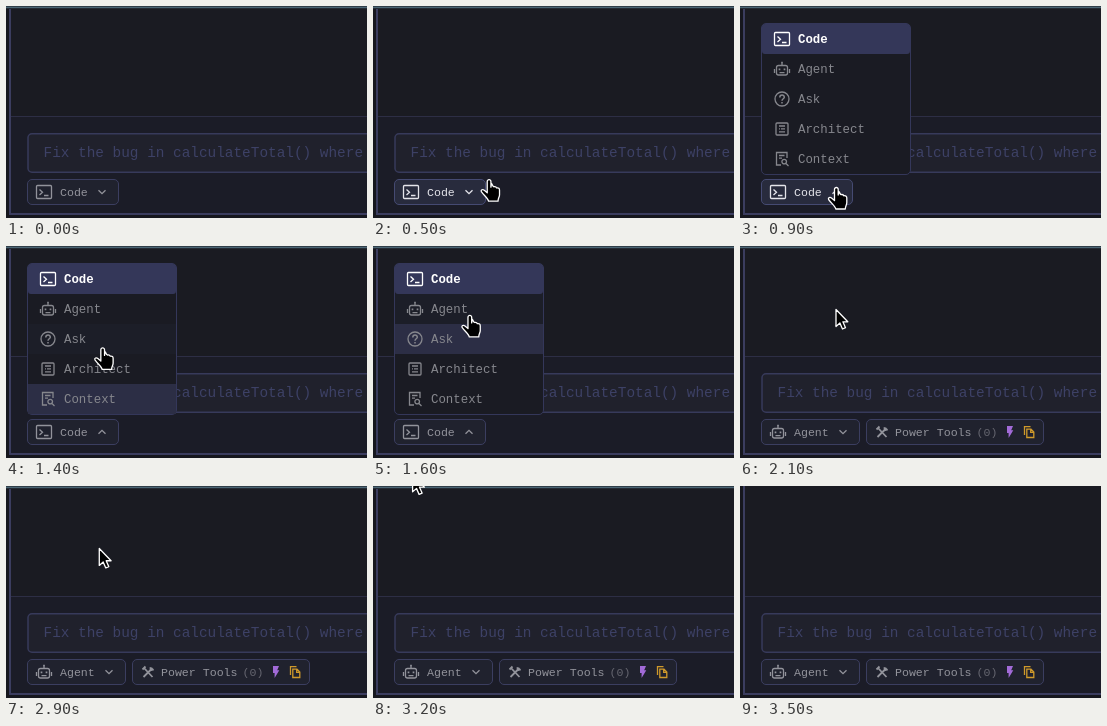
Recreate the animation shown at these times as an HTML page. Size 361 by 212 pixels, loop 3700 ms.

```html
<!DOCTYPE html>
<html lang="en">
<head>
<meta charset="utf-8">
<title>Mode picker</title>
<style>
  html, body { margin: 0; height: 100%; overflow: hidden; background: #16171e; }
  svg.stage { display: block; width: 100vw; height: 100vh; }
  text { font: 11.6px "Liberation Mono", monospace; fill: currentColor; white-space: pre; }
  .icon { fill: none; stroke: currentColor; stroke-width: 1.3; }
  .prompt { font-size: 14.4px; fill: #3d4166; }
  .button { color: #92939b; }
  .button rect.box { fill: #20222e; stroke: #3b3e60; }
  .button.hover { color: #e4e4ea; }
  .button.hover rect.box { fill: #282b3d; stroke: #454a72; }
  .menu { color: #86878d; }
  .menu text { font-size: 12.4px; }
  .menu .selected { color: #fff; }
  .menu .selected text { font-weight: bold; }
  .cursor { fill: #000; stroke: #fff; stroke-width: 1.3; stroke-linejoin: round; }
</style>
</head>
<body>
<svg class="stage" viewBox="0 0 361 212">
  <defs>
    <g id="terminal" class="icon">
      <rect x="-7.5" y="-6.5" width="15" height="13" rx="1"/>
      <path d="M-4.5-2.5L-1.5 0.3L-4.5 3M0 3.5H4.5"/>
    </g>
    <g id="robot" class="icon">
      <rect x="-5.5" y="-3.5" width="11" height="9.5" rx="2"/>
      <path d="M0-3.5V-6.5M-7.5 0V4M7.5 0V4M-2.5 3.7H2.5"/>
      <path d="M-2.5-.5V1.2M2.5-.5V1.2M-.8-6.5H.8" stroke-width="1.7"/>
    </g>
    <g id="question" class="icon">
      <circle r="7"/>
      <path d="M-2.2-1.5C-2.2-4.8 2.4-4.6 2.3-1.8C2.2-.2 0-.2 0 1.8M0 3V4.6" stroke-width="1.5"/>
    </g>
    <g id="plan" class="icon">
      <rect x="-6" y="-6" width="12" height="12" rx="1"/>
      <path d="M-3-3H3M-1-.2H3M-3 2.8H3M-3-.2H-2"/>
    </g>
    <g id="search" class="icon">
      <path d="M-1 6H-5.5V-6.5H5V-1M-3-3.5H2.5M-3-.8H0"/>
      <circle cx="2.2" cy="2.6" r="2.3"/>
      <path d="M4 4.5L6.5 7"/>
    </g>
    <path id="chevron" class="icon" d="M-3.5-1.8L0 1.7L3.5-1.8" stroke-width="1.5"/>
  </defs>

  <path fill="#1a1b22" d="M4 0H361V208H4z"/>
  <path fill="#1b1c27" d="M4 110H361V208H4z"/>
  <path fill="none" stroke="#2d2e45" d="M5 110.5H361"/>
  <path fill="none" stroke="#3b3d5f" stroke-width="2" d="M4 0V208H361"/>
  <g id="topLine">
    <path fill="#16171e" d="M0 0H361V3H0z"/>
    <path fill="#4b6674" d="M0 .5H361V2.3H0z"/>
  </g>

  <rect x="22" y="127.8" width="400" height="38.4" rx="4" fill="#20212c" stroke="#373a5b" stroke-width="1.5"/>
  <text class="prompt" x="37.5" y="151">Fix the bug in calculateTotal() where</text>

  <g class="button" id="modeButton">
    <rect class="box" id="modeBox" x="21.5" y="173.5" width="91" height="25" rx="4.5"/>
    <use id="modeIcon" x="38" y="186"/>
    <text id="modeName" x="54" y="190"></text>
    <use id="modeChevron" href="#chevron"/>
  </g>

  <g class="button" id="tools">
    <rect class="box" x="126.5" y="173.5" width="177" height="25" rx="4.5"/>
    <g class="icon" transform="translate(142 186)" stroke-width="1.8">
      <path d="M-4.5 5L4.5-4M-4-4L4.5 5" style="stroke-width:1.8"/>
      <path d="M-5.5-2.5L-2.5-5.5M2.3-4.8L3-1.8L5.8-2.5" style="stroke-width:1.8"/>
    </g>
    <text x="155" y="190">Power Tools</text>
    <text x="236.5" y="190" fill-opacity=".6">(0)</text>
    <path fill="#a26bd8" d="M267 180H273L271.2 184.2H273.3L268.6 192V187H267z"/>
    <path fill="none" stroke="#cf9a2b" stroke-width="1.3" d="M284.5 189V180.7H290.5M286.8 183.2H291L293.8 186V191.5H286.8zM290.7 183.5V186.3H293.5"/>
  </g>

  <g class="menu" id="menu">
    <rect x="21.5" y="17.5" width="149" height="151" rx="4.5" fill="#1a1b23" stroke="#34375a"/>
  </g>

  <g class="cursor" id="cursor">
    <path id="arrow" d="M.5.5V17.5L4.4 14L7 20L10 18.7L7.4 12.8H12.3z"/>
    <path id="hand" d="M-.5 1.5C-.5-1.2 3.2-1.2 3.2 1.5V7C4-.0 4 5.7 6 6.6C8 6.2 8.6 7 8.8 7.8C11 7.4 11.8 8.5 11.8 10V14.5C11.8 17 10.3 18 10.3 21H.8C.5 18.5-3 16-6.4 11.5C-7.2 9.6-5 8.8-3.5 10L-.5 12.6z"/>
  </g>
</svg>

<script>
const LOOP = 3700, STEP = 100;
const OPEN = 900, CLOSE = 2100, LINE_END = 3500;
const MENU_TOP = 18, ROW = 30;
const ITEMS = [["Code", "terminal"], ["Agent", "robot"], ["Ask", "question"],
               ["Architect", "plan"], ["Context", "search"]];
const $ = id => document.getElementById(id);
const show = (id, on) => $(id).setAttribute("visibility", on ? "visible" : "hidden");

$("menu").innerHTML += ITEMS.map(([name, icon], i) => {
  const y = MENU_TOP + i * ROW;
  const fill = i ? "#2c2e45" : "#343759";
  return `<g class="${i ? "" : "selected"}">
    <rect class="row" x="22" y="${y}" width="148" height="${ROW}" rx="${i ? 0 : 3}" fill="${fill}"/>
    <use href="#${icon}" x="42" y="${y + 15}"/><text x="58" y="${y + 19}">${name}</text></g>`;
}).join("");
const rows = [...document.querySelectorAll(".row")];

// Same curve as the CSS keyword "ease".
function ease(u) {
  if (u <= 0) return 0;
  if (u >= 1) return 1;
  let lo = 0, hi = 1, s;
  for (let i = 0; i < 20; i++) {
    s = (lo + hi) / 2;
    if (.75 * s * (1 - s) + s ** 3 < u) lo = s; else hi = s;
  }
  return .3 * s * (1 - s) ** 2 + 3 * s * s * (1 - s) + s ** 3;
}

function pointer(t) {
  if (t < 1150) {
    const p = ease((t - 150) / 600);
    return [251 - 156 * p, 120 + 62 * p];
  }
  if (t < 2865) {
    const p = ease((t - 1150) / 640);
    return [95 + p * .5, 182 - 119 * p];
  }
  const p = ease((t - 2865) / 600);
  return [95.5 - 66 * p, 63 - 93 * p ** 1.4];
}

const rowAt = t => Math.floor((pointer(t)[1] + 1 - MENU_TOP) / ROW);

function draw(t) {
  const [x, y] = pointer(t);
  const open = t >= OPEN && t < CLOSE, picked = t >= CLOSE;
  const onButton = !picked && y >= 172 && x < 118;

  show("topLine", t < LINE_END);
  show("menu", open);
  show("tools", picked);
  rows.forEach((row, i) => {
    if (i) row.setAttribute("opacity", rowAt(t - STEP) === i ? 1 : rowAt(t) === i ? .15 : 0);
  });

  const [name, icon] = ITEMS[+picked];
  $("modeName").textContent = name;
  $("modeIcon").setAttribute("href", "#" + icon);
  $("modeBox").setAttribute("width", picked ? 98 : 91);
  $("modeChevron").setAttribute("transform", `translate(${picked ? 103 : 96} 186) scale(1 ${open ? -1 : 1})`);
  $("modeButton").classList.toggle("hover", onButton);

  const seen = t >= 200 && t < 3300, hand = onButton || open;
  show("arrow", seen && !hand);
  show("hand", seen && hand);
  $("cursor").setAttribute("transform", `translate(${x} ${y})`);
}

function frame() {
  const t = performance.now() % LOOP;
  draw(Math.floor(t / STEP) * STEP);
  requestAnimationFrame(frame);
}
frame();
</script>
</body>
</html>
```
